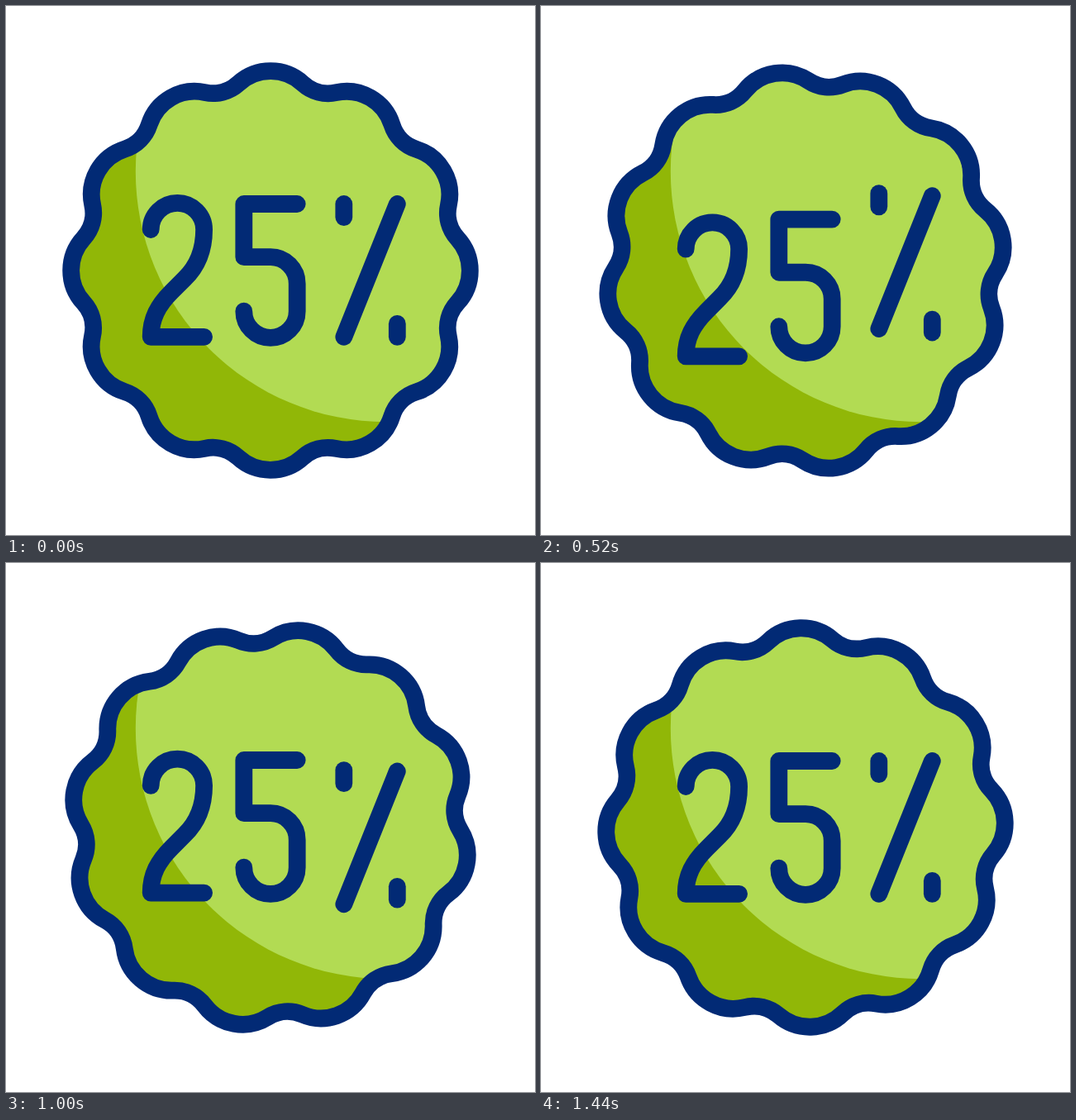
Recreate the animation shown at these times as an HTML page. Size 640 by 640 pixels, loop 1.48 s.

```html
<!DOCTYPE html>
<html lang="en">
<head>
<meta charset="utf-8">
<title>Discount badge</title>
<style>
  html, body { margin: 0; width: 100%; height: 100%; overflow: hidden; background: #fff; }
  svg { display: block; width: 100vw; height: 100vh; }
  .line { fill: none; stroke: #022a75; stroke-width: 20.8; stroke-linecap: round; stroke-linejoin: round; }
</style>
</head>
<body>
<svg viewBox="0 0 640 640">
  <defs>
    <clipPath id="inside"><path class="badge"/></clipPath>
  </defs>
  <path class="badge" fill="#91b707"/>
  <g clip-path="url(#inside)"><circle cx="460" cy="200" r="303.2" fill="#b2db53"/></g>
  <path class="badge line"/>
  <g class="line">
    <path id="two" d="M175.2 270.5A32.2 32.2 0 0 1 239.6 270.5C239.6 299 229 317.5 216 330L200 346C184 362 175.2 378 175.2 400.3H239.6"/>
    <path id="five" d="M352.2 239.5H287.8V303.7H320A32.2 32.2 0 0 1 352.2 335.9V369.2A32.2 32.2 0 0 1 287.8 369.2"/>
    <path id="slash" d="M473.3 239.5L408.8 400.3"/>
    <path id="topDot" d="M408.8 239.5V255.6"/>
    <path id="lowDot" d="M473.3 384.4V400.3"/>
  </g>
</svg>
<script>
  const LOOP = 1480, TURN = 60, C = 320;
  const LOBES = 12, STEP = 2 * Math.PI / LOBES;

  // Lobes and notches are circles that touch each other.
  const LOBE = { dist: 183.6, r: 57.7 }, NOTCH = { dist: 269, r: 45.5 };

  const polar = (r, a) => [C + r * Math.sin(a), C - r * Math.cos(a)];

  function badgePath() {
    const [lx, ly] = polar(LOBE.dist, 0);
    const [nx, ny] = polar(NOTCH.dist, STEP / 2);
    const k = LOBE.r / (LOBE.r + NOTCH.r);
    const x = lx + (nx - lx) * k - C, y = C - (ly + (ny - ly) * k);
    const rad = Math.hypot(x, y), half = Math.atan2(x, y);
    let d = "M" + polar(rad, -half);
    for (let i = 0; i < LOBES; i++) {
      const a = i * STEP;
      d += `A${LOBE.r} ${LOBE.r} 0 0 1 ${polar(rad, a + half)}`;
      d += `A${NOTCH.r} ${NOTCH.r} 0 0 0 ${polar(rad, a + STEP - half)}`;
    }
    return d + "Z";
  }

  // Vertical offsets as [time, dy] keys, eased in and out.
  const sway = (a, b, c, d) => [[a, 0], [b, -12.8], [c, 12.8], [d, 0]];
  const moves = {
    two: [[80, 0], [560, 24], [980, -1.2], [1330, 0]],
    five: [[70, 0], [400, 24], [805, -1.5], [1300, 0]],
    slash: sway(80, 400, 965, 1350),
    topDot: sway(90, 510, 1092, 1410),
    lowDot: sway(50, 350, 828, 1194)
  };

  const ease = u => u * u * (3 - 2 * u);

  function valueAt(keys, t) {
    if (t <= keys[0][0]) return keys[0][1];
    for (let i = 1; i < keys.length; i++) {
      const [t0, v0] = keys[i - 1], [t1, v1] = keys[i];
      if (t < t1) return v0 + (v1 - v0) * ease((t - t0) / (t1 - t0));
    }
    return keys[keys.length - 1][1];
  }

  const badges = document.querySelectorAll(".badge");
  const shape = badgePath();
  badges.forEach(b => b.setAttribute("d", shape));
  const parts = Object.entries(moves).map(([id, keys]) => [document.getElementById(id), keys]);

  function draw(t) {
    const spin = `rotate(${TURN * t / LOOP} ${C} ${C})`;
    badges.forEach(b => b.setAttribute("transform", spin));
    for (const [el, keys] of parts) {
      el.setAttribute("transform", `translate(0 ${valueAt(keys, t)})`);
    }
  }

  const start = performance.now();
  function tick(now) {
    draw(Math.max(0, now - start) % LOOP);
    requestAnimationFrame(tick);
  }
  draw(0);
  requestAnimationFrame(tick);
</script>
</body>
</html>
```
